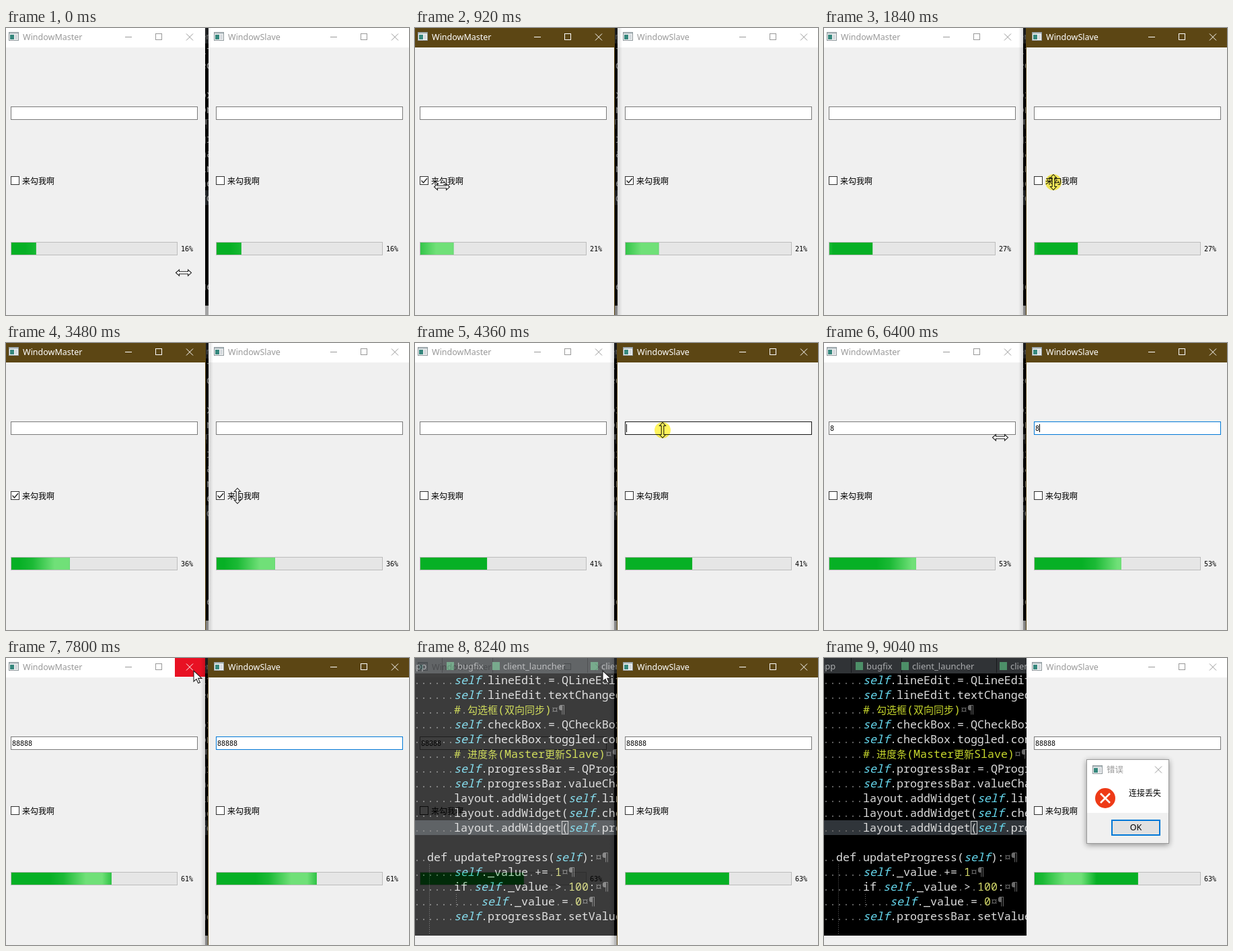
These frames come from a looping animation (599 by 428 pixels, 9.12 s). An HTML page:

```html
<!DOCTYPE html>
<html lang="zh">
<head>
<meta charset="utf-8">
<style>
html, body { margin: 0; width: 100%; height: 100%; overflow: hidden; background: #000; }
svg { display: block; width: 599px; height: 428px; }
.code { font: 16.667px "Noto Sans Mono", "DejaVu Sans Mono", monospace; fill: #dcdcdc; }
.cjk { font-family: "Noto Sans CJK SC", "Noto Sans CJK", sans-serif; font-size: 15px; }
.self { fill: #66d9ef; font-style: italic; }
.dim { fill: #6a6a6a; }
.num { fill: #d3d86a; }
.note { fill: #c6d62c; }
.tab { font: 13px "Noto Sans", "Open Sans", sans-serif; fill: #a9abad; }
.title { font: 12.5px "Noto Sans", "Noto Sans CJK SC", "Noto Sans CJK", sans-serif; }
.label { font: 12px "Noto Sans CJK SC", "Noto Sans CJK", sans-serif; }
.value { font: 10px "DejaVu Sans Mono", monospace; }
.crisp { shape-rendering: crispEdges; }
</style>
</head>
<body>
<svg id="stage" viewBox="0 0 599 428" xmlns="http://www.w3.org/2000/svg"></svg>
<script>
const LOOP = 9120;
const BROWN = '#5c4614';
const stage = document.getElementById('stage');
const $ = id => document.getElementById(id);
const set = (id, attrs) => {
  for (const k in attrs) $(id).setAttribute(k, attrs[k]);
};
const show = (id, on) => set(id, { visibility: on ? 'visible' : 'hidden' });
const rect = (x, y, w, h, fill, extra = '') =>
  `<rect x="${x}" y="${y}" width="${w}" height="${h}" fill="${fill}" ${extra}/>`;
const text = (x, y, cls, str, extra = '') =>
  `<text x="${x}" y="${y}" class="${cls}" ${extra}>${str}</text>`;

// ---- Editor behind the windows ----
const lines = [
  [58, 'self.lineEdit = QLineEdit(self)'],
  [58, 'self.lineEdit.textChanged.connect('],
  [58, '# 勾选框(双向同步)¤¶'],
  [58, 'self.checkBox = QCheckBox(self)'],
  [58, 'self.checkBox.toggled.connect('],
  [58, '# 进度条(Master更新Slave)¤¶'],
  [58, 'self.progressBar = QProgressBar('],
  [58, 'self.progressBar.valueChanged'],
  [58, 'layout.addWidget(self.lineEdit)'],
  [58, 'layout.addWidget(self.checkBox)'],
  [58, 'layout.addWidget(self.progressBar)'],
  null,
  [18, 'def updateProgress(self):¤¶'],
  [58, 'self._value += 1¤¶'],
  [58, 'if self._value > 100:¤¶'],
  [98, 'self._value = 0¤¶'],
  [58, 'self.progressBar.setValue(']
];

function codeLine(line, row) {
  if (!line) return '';
  const [x, src] = line;
  const note = src[0] === '#';
  const indent = Math.ceil(x / 10);
  const tokens = src.match(/self|[\u4e00-\u9fff]+|\d+| |[¤¶]+|[^\s\d¤¶\u4e00-\u9fff]+?(?=self|[\s\d¤¶\u4e00-\u9fff]|$)/g);
  const span = (cls, s) => `<tspan class="${cls}">${s}</tspan>`;
  const body = tokens.map(s => {
    s = s.replace('>', '&gt;');
    if (s === ' ') return span('dim', '.');
    if (/[¤¶]/.test(s)) return span('dim', s);
    if (/[\u4e00-\u9fff]/.test(s)) return span('cjk note', s);
    if (note) return span('note', s);
    if (s === 'self') return span('self', s);
    return /^\d/.test(s) ? span('num', s) : s;
  }).join('');
  return text(x - indent * 10, 39 + row * 22, 'code', span('dim', '.'.repeat(indent)) + body);
}

function editor() {
  const tabs = [[-6, 'app'], [63, 'bugfix'], [131, 'client_launcher'], [277, 'client_main']];
  return rect(0, 0, 320, 428, '#000') +
    rect(0, 242, 320, 22, '#30353a') +
    lines.map(codeLine).join('') +
    rect(218.5, 243.5, 9, 19, 'none', 'stroke="#d0d0d0"') +
    '<path d="M21.5 308V412M61.5 352V372" stroke="#666" stroke-dasharray="1 2"/>' +
    rect(0, 0, 320, 23, '#303336') +
    [40, 115, 256].map(x => rect(x, 0, 1, 22, '#17191b')).join('') +
    tabs.map(([x, s]) => text(x, 17, 'tab', s) +
      (x > 0 ? rect(x - 16, 6, 11, 12, '#4d8f68') : '')).join('') +
    rect(0, 414, 320, 14, '#f0f0f0');
}

// ---- Windows ----
const appIcon = (x, y) => `<g class="crisp" transform="translate(${x} ${y})">` +
  rect(0.5, 0.5, 14, 12, '#f6f6f6', 'stroke="#8d979b"') + rect(1, 1, 13, 2, '#b9c4c8') +
  rect(2, 4, 6, 7, '#36877d') + rect(9, 4, 4, 7, '#d5dade') + '</g>';

function win(id, x, title) {
  return `<g id="${id}"><g transform="translate(${x} 0)">
    <g id="${id}Glow">${rect(297, 0, 11, 428, 'url(#shadeR)')}${rect(-16, 0, 11, 428, 'url(#shadeL)')}
      ${rect(-5, 0, 302, 428, BROWN)}</g>
    ${rect(-4, 0, 300, 428, '#f0f0f0')}
    <rect id="${id}Bar" x="-4" width="300" height="29"/>
    <rect id="${id}Hot" x="251" width="45" height="28" fill="#e81123"/>
    ${appIcon(4, 6)}
    ${text(25, 18, 'title', title, `id="${id}Title"`)}
    <g id="${id}Btn" fill="none"><path class="crisp" d="M177 13.5H187M222.5 8.5H231.5V17.5H222.5Z"/></g>
    <path id="${id}X" d="M268 8.5L278 18.5M278 8.5L268 18.5" fill="none"/>
    <rect id="${id}Edit" class="crisp" x="7.5" y="117.5" width="277" height="19" fill="#fff"/>
    ${text(9, 131, 'value', '', `id="${id}Text"`)}
    <rect id="${id}Caret" class="crisp" y="121" width="1" height="12"/>
    ${rect(7.5, 221.5, 12, 12, '#fff', 'class="crisp" stroke="#333"')}
    <path id="${id}Tick" d="M9.5 227.5L12.5 230.7L18 224.2" fill="none" stroke="#222" stroke-width="1.4"/>
    ${text(24, 233, 'label', '来勾我啊')}
    ${rect(7.5, 319.5, 247, 19, '#e6e6e6', 'class="crisp" stroke="#bcbcbc"')}
    <rect id="${id}Fill" x="8" y="320" height="18" fill="#06b025"/>
    <rect id="${id}Shine" x="8" y="320" height="18" fill="url(#shine)"/>
    ${text(260, 333, 'value', '', `id="${id}Pct"`)}
  </g></g>`;
}

const dialog = `<g id="dialog">
  ${rect(390, 153, 123, 126, '#000', 'opacity=".4" filter="url(#blur)"')}
  ${rect(390.5, 151.5, 122, 125, '#fff', 'class="crisp" stroke="#9a9a9a"')}
  ${rect(391, 231, 121, 45, '#f0f0f0')}
  ${appIcon(399, 160)}
  ${text(420, 171, 'title', '错误', 'fill="#999"')}
  <path d="M492 161.5L502 171.5M502 161.5L492 171.5" stroke="#999"/>
  <circle cx="418" cy="209" r="15" fill="#ee3a17"/>
  <path d="M411 202L425 216M425 202L411 216" stroke="#fff" stroke-width="2.6"/>
  ${text(453, 206, 'label', '连接丢失')}
  ${rect(428, 242, 71, 22, '#e1e1e1', 'stroke="#0078d7" stroke-width="2"')}
  ${text(463.5, 257, 'title', 'OK', 'text-anchor="middle"')}
</g>`;

const shade = (id, a, b) => `<linearGradient id="${id}">
  <stop offset="0" stop-opacity="${a}"/><stop offset="1" stop-opacity="${b}"/></linearGradient>`;
const shineStops = [[0, 0], [0.2, 0.2], [0.53, 1], [0.77, 1], [1, 0]]
  .map(([o, a]) => `<stop offset="${o}" stop-color="#70e078" stop-opacity="${a}"/>`).join('');

stage.innerHTML = `<defs>${shade('shadeR', 0.22, 0)}${shade('shadeL', 0, 0.22)}
  <linearGradient id="shine" gradientUnits="userSpaceOnUse" y1="0" y2="0">${shineStops}</linearGradient>
  <filter id="blur" x="-20%" y="-20%" width="140%" height="140%"><feGaussianBlur stdDeviation="4"/></filter></defs>
  ${editor()}<rect id="gap" x="296" width="5" height="428" opacity=".32"/>
  <g id="desk">${win('m', 0, 'WindowMaster')}${win('s', 305, 'WindowSlave')}</g>
  ${dialog}
  <path id="cursor" fill="#fff" stroke="#222" stroke-width="1.1"/>
  <circle id="click" r="12" fill="#fff45c" style="mix-blend-mode:multiply"/>`;

// ---- Timeline ----
const CLOSE = 8120, ALERT = 8500;
const active = [[0, ''], [480, 'm'], [1760, 's'], [2680, 'm'], [3560, 's'], [7960, 'm'], [CLOSE, 's'], [ALERT, '']];
const focus = [[0, ''], [480, 'm'], [680, ''], [4300, 's'], [7960, '']];
const checked = [[0, 0], [680, 1], [1080, 0], [1920, 1], [2240, 0], [2840, 1], [3720, 0]];
const clicks = [480, 940, 1760, 2120, 2680, 3560, 4300, 7960];
const shineStarts = [-600, 520, 1700, 2916, 4270, 5600, 7050, 8552];
const typed = [[0, '']];
for (let i = 1; i <= 6; i++) typed.push([4360 + i * 120, '6'.repeat(i)]);
for (let i = 1; i <= 6; i++) typed.push([5430 + i * 70, '6'.repeat(6 - i)]);
typed.push([6000, '8']);
for (let i = 2; i <= 5; i++) typed.push([6240 + i * 160, '8'.repeat(i)]);

const pointer = [
  [0, 264, 365], [60, 264, 365], [320, 40, 237], [1280, 40, 237], [1660, 341, 230],
  [2280, 341, 230], [2580, 44, 235], [2960, 44, 235], [3340, 344, 228], [3860, 344, 228],
  [4220, 368, 130], [5460, 368, 130], [5800, 350, 145], [6320, 262, 141], [6420, 262, 141],
  [6900, 240, 420], [7300, 262, 200], [7640, 279, 19], [8260, 279, 19], [8800, 290, 445]
];
const RESIZE = 'M-11.5 0L-6.5-4.5V-1.8H6.5V-4.5L11.5 0L6.5 4.5V1.8H-6.5V4.5Z';
const ARROW = 'M0 0V16L4 12.4L6.8 18.6L9.4 17.4L6.7 11.4H12Z';

const entryAt = (list, t) => list.filter(e => e[0] <= t).pop();
const valueAt = (list, t) => entryAt(list, t)[1];

function pointerAt(t) {
  const i = pointer.findIndex(p => p[0] > t);
  if (i < 0) return pointer[pointer.length - 1].slice(1);
  const [t0, x0, y0] = pointer[i - 1], [t1, x1, y1] = pointer[i];
  const u = (t - t0) / (t1 - t0), e = u * u * (3 - 2 * u);
  return [x0 + (x1 - x0) * e, y0 + (y1 - y0) * e];
}

function drawWindow(id, ox, t, s) {
  const on = s.active === id;
  const hot = id === 'm' && s.x > 250 && s.x < 296 && s.y < 29 && t < CLOSE;
  const ink = on ? '#fff' : '#999';
  const lx = s.x - ox;
  const hover = lx > 7 && lx < 285 && s.y > 117 && s.y < 137;
  const focused = on && s.focus === id;
  show(id + 'Glow', on);
  show(id + 'Hot', hot);
  set(id + 'Bar', { fill: on ? BROWN : '#fff' });
  set(id + 'Title', { fill: ink });
  set(id + 'Btn', { stroke: ink });
  set(id + 'X', { stroke: hot ? '#fff' : ink });
  set(id + 'Edit', { stroke: hover ? '#171717' : focused ? '#0078d7' : '#7a7a7a' });
  $(id + 'Text').textContent = s.text;
  set(id + 'Caret', { x: 9 + s.text.length * 6 });
  show(id + 'Caret', focused && s.blink);
  show(id + 'Tick', s.checked);
  set(id + 'Fill', { width: s.fill });
  set(id + 'Shine', { width: s.fill });
  $(id + 'Pct').textContent = s.pct + '%';
}

function draw(t) {
  const [x, y] = pointerAt(t);
  const pct = Math.min(63, 16 + Math.floor((t + 50) / 171));
  const [keyTime, str] = entryAt(typed, t);
  const since = t - Math.max(keyTime, entryAt(focus, t)[0]);
  const s = {
    x, y, pct, text: str,
    fill: 2.49 * pct - 3,
    active: valueAt(active, t),
    focus: valueAt(focus, t),
    checked: valueAt(checked, t),
    blink: since % 1060 < 530
  };
  drawWindow('m', 0, t, s);
  drawWindow('s', 305, t, s);

  const top = s.active || 's';
  if ($('desk').lastElementChild.id !== top) $('desk').append($(top));

  const start = shineStarts.filter(v => v <= t).pop();
  const peak = 8 + (t - start) / 4 - 65;
  set('shine', { x1: peak - 65, x2: peak + 35 });

  const fade = Math.max(0, Math.min(1, 1 - (t - CLOSE) / 160));
  set('m', { opacity: fade });
  set('gap', { opacity: 0.32 * fade });
  show('dialog', t >= ALERT);

  const arrow = t > 7400;
  const turn = !arrow && x > 299 ? ' rotate(90)' : '';
  set('cursor', { d: arrow ? ARROW : RESIZE, transform: `translate(${x} ${y})${turn}` });
  set('click', { cx: x, cy: y });
  show('click', clicks.some(c => t >= c && t < c + 160));
}

function tick(now) {
  draw(now % LOOP);
  requestAnimationFrame(tick);
}
draw(0);
requestAnimationFrame(tick);
</script>
</body>
</html>
```
